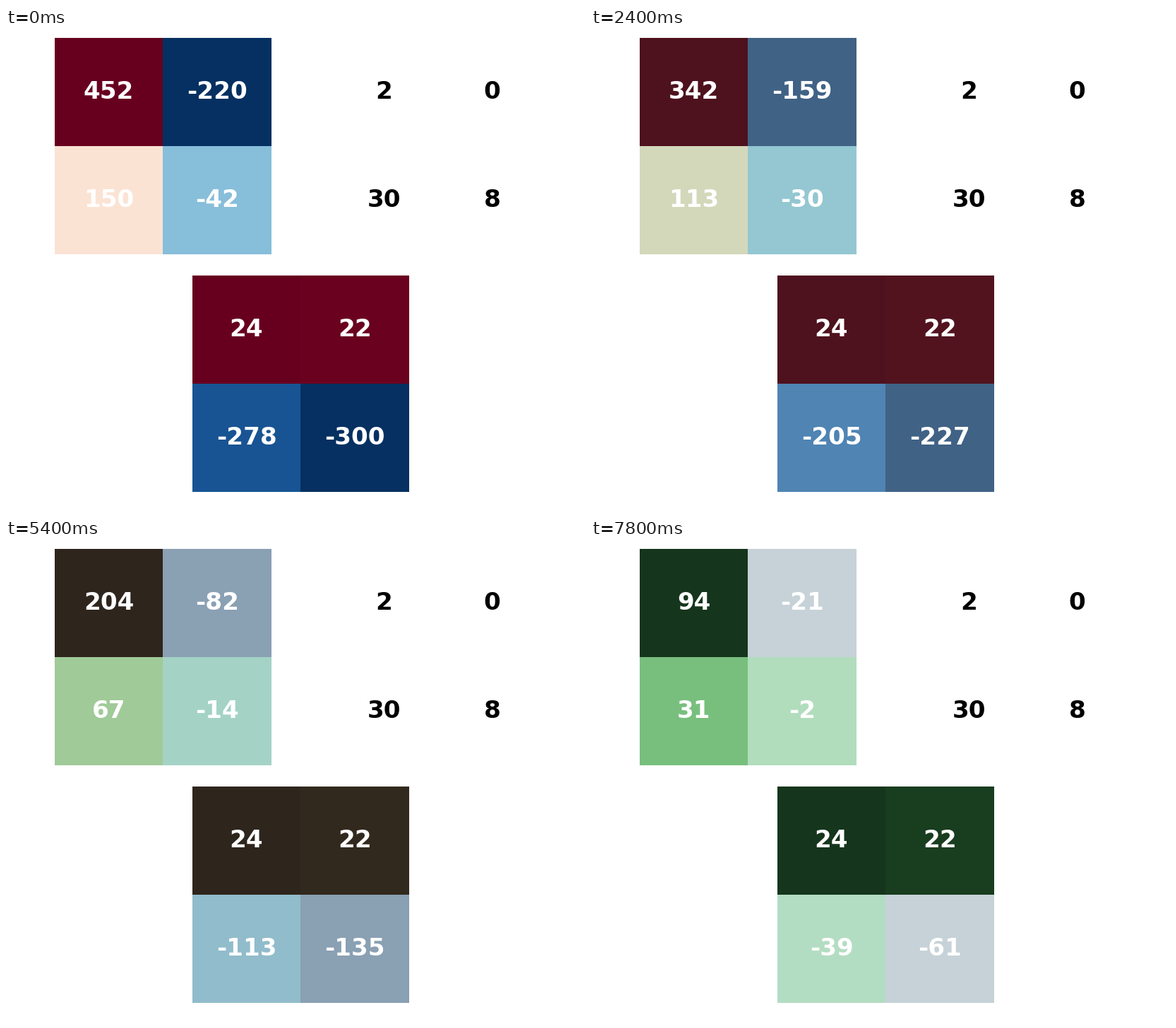
Recreate the animation shown at these times as a matplotlib script. Size 820x683 px, loop 8000 ms.

```python
import numpy as np
import matplotlib.pyplot as plt
from matplotlib.animation import FuncAnimation
from matplotlib.patches import Rectangle

W, H, DPI = 820, 683, 64
FRAMES, INTERVAL = 40, 200
STEPS = 49  # steps for the complete transition
FONT_PX = 34.17

# Start and end values of the two coloured matrices
TOP_START = np.array([[452, -220], [150, -42]])
TOP_END = np.array([[2, 30], [0, 8]])
LOW_START = np.array([[24, 22], [-278, -300]])
LOW_END = np.array([[24, 22], [22, 0]])
FIXED = np.array([[2, 0], [30, 8]])

# The top matrix keeps the shading of this one throughout
TOP_SHADE = np.array([[5, -2], [2, 0]])

COLD = plt.get_cmap("RdBu_r")
GREEN = plt.get_cmap("Greens")

fig = plt.figure(figsize=(W / DPI, H / DPI), dpi=DPI, facecolor="white")
ax = fig.add_axes([0, 0, 1, 1])
ax.set_xlim(0, W)
ax.set_ylim(H, 0)
ax.axis("off")


def add_labels(xs, ys, color):
    """Place four empty labels at the cell centres, row by row."""
    return [
        ax.text((xs[c] + xs[c + 1]) / 2, (ys[r] + ys[r + 1]) / 2, "",
                ha="center", va="center", color=color, weight="bold",
                family="DejaVu Sans", size=FONT_PX * 72 / DPI)
        for r in range(2) for c in range(2)
    ]


def add_cells(xs, ys):
    """Fill the grid given by its edges with four borderless cells."""
    cells = []
    for r in range(2):
        for c in range(2):
            cell = Rectangle((xs[c], ys[r]), xs[c + 1] - xs[c],
                             ys[r + 1] - ys[r], linewidth=0,
                             antialiased=False)
            cells.append(ax.add_patch(cell))
    return cells


def blend(values, t):
    """Normalise the values and mix the two colour maps."""
    span = values.max() - values.min()
    level = ((values - values.min()) / span).ravel()
    return (1 - t) * COLD(level) + t * GREEN(level)


def paint(cells, labels, values, colors):
    for cell, label, value, color in zip(cells, labels, values.flat, colors):
        cell.set_facecolor(color)
        label.set_text(f"{value:.0f}")


top_grid = (69, 222, 376), (14, 167, 320)
low_grid = (264, 417, 571), (350, 503, 656)
fixed_grid = (458.5, 612, 765.5), (14, 167, 320)

top_cells = add_cells(*top_grid)
low_cells = add_cells(*low_grid)
top_labels = add_labels(*top_grid, "white")
low_labels = add_labels(*low_grid, "white")
for label, value in zip(add_labels(*fixed_grid, "black"), FIXED.flat):
    label.set_text(str(value))


def update(i):
    t = i / STEPS
    top = TOP_START + (TOP_END - TOP_START) * t
    low = LOW_START + (LOW_END - LOW_START) * t
    paint(top_cells, top_labels, top, blend(TOP_SHADE, t))
    paint(low_cells, low_labels, low, blend(low, t))
    return top_cells + low_cells + top_labels + low_labels


anim = FuncAnimation(fig, update, frames=FRAMES, interval=INTERVAL,
                     repeat=True, repeat_delay=0, blit=False)
plt.show()
```
